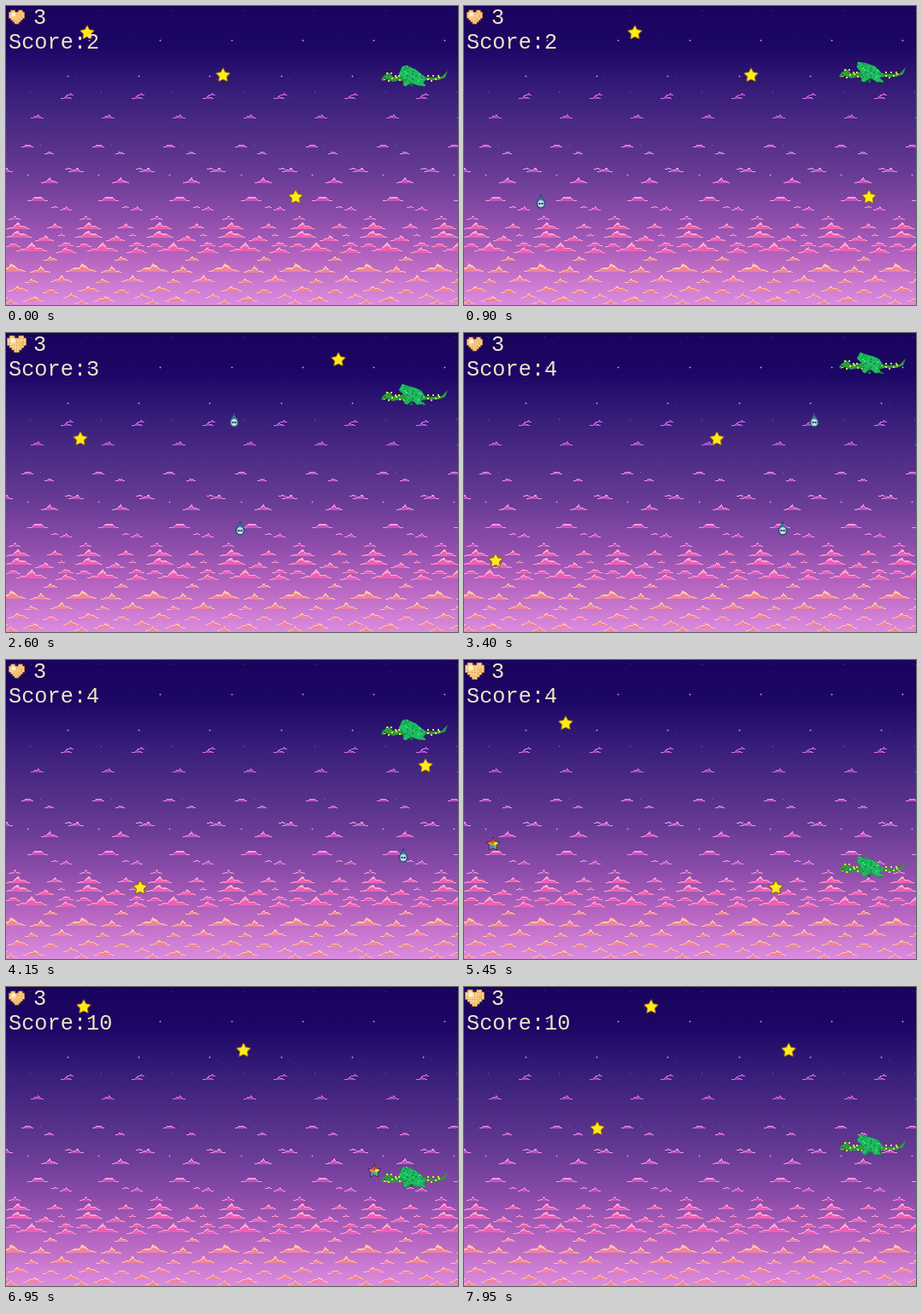
Write an HTML page with a canvas that moves like this. It is 529 by 351 pixels and loops after 8 s.

```html
<!DOCTYPE html>
<html lang="en">
<head>
<meta charset="utf-8">
<title>Dragon flight</title>
<style>
  html, body { margin: 0; width: 100%; height: 100%; overflow: hidden; background: #19035c; }
  canvas { display: block; width: 529px; height: 351px; }
</style>
</head>
<body>
<canvas id="stage" width="529" height="351"></canvas>
<script>
const W = 529, H = 351, LOOP = 8000, STEP = 50, TILE = 83.2;
const ctx = document.getElementById('stage').getContext('2d');

// Linear interpolation through [time, value] pairs; the outer segments extend when asked.
function track(keys, t, extend) {
  let i = 0;
  while (i < keys.length - 2 && t > keys[i + 1][0]) i++;
  const [t0, v0] = keys[i], [t1, v1] = keys[i + 1];
  let k = (t - t0) / (t1 - t0);
  if (!extend) k = Math.max(0, Math.min(1, k));
  return v0 + (v1 - v0) * k;
}

function polygon(g, points, fill, stroke) {
  g.beginPath();
  for (let i = 0; i < points.length; i += 2) g.lineTo(points[i], points[i + 1]);
  g.closePath();
  if (stroke) { g.strokeStyle = stroke; g.stroke(); }
  if (fill) { g.fillStyle = fill; g.fill(); }
}

function random(seed) {
  return () => (seed = (seed * 16807) % 2147483647) / 2147483647;
}

// ---------- Sky ----------
// Cloud rows inside one tile: centre x, base y, width.
const clouds = [
  [70, 109, 13], [75, 105, 8], [36, 132, 15], [25, 166, 14], [50, 174, 11],
  [73, 192, 8], [82, 195, 18], [51, 208, 20], [37, 229, 24], [57, 237, 8],
  [70, 240, 14], [10, 251, 14], [57, 261, 18], [14, 262, 28], [65, 270, 8],
  [14, 272, 32], [45, 276, 22], [70, 282, 18], [8, 283, 18], [30, 288, 36],
  [70, 290, 24], [52, 299, 16], [5, 312, 36], [40, 313, 24], [65, 324, 26],
  [30, 325, 16], [14, 335, 24], [52, 337, 18], [76, 343, 18], [32, 347, 24], [5, 350, 16]
];

function cloudColours(y) {
  if (y < 140) return ['#a13fc4', '#d274e4'];
  if (y < 200) return ['#b950c0', '#ec9ade'];
  if (y < 255) return ['#c94fc0', '#f59cda'];
  if (y < 295) return ['#ee5fb6', '#ffa8c9'];
  return ['#f0839f', '#ffc5a5'];
}

function drawCloud(g, cx, base, width) {
  const [body, light] = cloudColours(base), half = width / 2;
  for (let dx = -half; dx < half; dx++) {
    const u = dx / half;
    const bump = 0.55 + 0.45 * Math.abs(Math.cos(u * 4.5 + base * 0.35));
    const h = Math.max(1, Math.round(width ** 0.78 * 0.68 * (1 - Math.abs(u) ** 0.8) * bump));
    const x = Math.round(cx + dx), top = base - h;
    g.fillStyle = body;
    g.fillRect(x, top, 1, h);
    g.fillStyle = light;
    g.fillRect(x, top, 1, Math.max(1, h * 0.4 | 0));
  }
}

function makeSky() {
  const sky = document.createElement('canvas');
  sky.width = W; sky.height = H;
  const g = sky.getContext('2d');
  const shade = g.createLinearGradient(0, 0, 0, H);
  [[0, '#19035c'], [50, '#1d0766'], [100, '#371d79'], [150, '#4f2d87'], [200, '#693c96'],
   [250, '#8e4dab'], [300, '#b867c2'], [351, '#dc8cde']]
    .forEach(([y, colour]) => shade.addColorStop(y / H, colour));
  g.fillStyle = shade;
  g.fillRect(0, 0, W, H);

  const rnd = random(77);
  const specks = Array.from({ length: 14 }, () => [rnd() * TILE, rnd() * 160, 0.1 + rnd() * 0.2]);
  specks.push([28, 101, 0.6], [40, 163, 0.5]);
  const sparkles = [[14, 40], [72, 82], [25, 198]];
  for (let x0 = -TILE; x0 < W + TILE; x0 += TILE) {
    g.fillStyle = '#d296ff';
    for (const [x, y, alpha] of specks) {
      g.globalAlpha = alpha;
      g.fillRect(Math.round(x0 + x), Math.round(y), 1, 1);
    }
    for (const [x, y] of sparkles) {
      const px = Math.round(x0 + x);
      g.globalAlpha = 0.4;
      g.fillRect(px - 1, y, 3, 1);
      g.fillRect(px, y - 1, 1, 3);
      g.globalAlpha = 0.9;
      g.fillRect(px, y, 1, 1);
    }
    g.globalAlpha = 1;
    for (const [x, y, w] of clouds) drawCloud(g, x0 + x, y, w);
  }
  return sky;
}
const sky = makeSky();

// ---------- Flying things ----------
const starPoints = Array.from({ length: 10 }, (_, i) => {
  const r = i % 2 ? 4.2 : 8, a = i * Math.PI / 5 - Math.PI / 2;
  return [r * Math.cos(a), r * Math.sin(a) + 0.5];
}).flat();

const sprites = {
  star() {
    ctx.lineWidth = 2;
    ctx.lineJoin = 'round';
    polygon(ctx, starPoints, '#ffe91c', '#8a5a10');
  },
  rainbow() {
    ctx.scale(0.85, 0.85);
    ctx.lineWidth = 2;
    polygon(ctx, starPoints, '#f4d52c', '#30203c');
    ctx.clip();
    ['#f03a40', '#f4e030', '#38c850', '#3a90e8', '#f08028'].forEach((colour, i) => {
      const a = i * Math.PI * 0.4 - Math.PI * 0.7;
      ctx.beginPath();
      ctx.moveTo(0, 0.5);
      ctx.arc(0, 0.5, 10, a, a + Math.PI * 0.4);
      ctx.fillStyle = colour;
      ctx.fill();
    });
  },
  ghost() {
    ctx.beginPath();
    ctx.moveTo(0, -9);
    ctx.bezierCurveTo(0, -4, 5, -3, 5, 2);
    ctx.bezierCurveTo(5, 9, -5, 9, -5, 2);
    ctx.bezierCurveTo(-5, -2, -1, -4, 0, -9);
    ctx.fillStyle = '#3d7b9a';
    ctx.fill();
    ctx.lineWidth = 1;
    ctx.strokeStyle = '#23466f';
    ctx.stroke();
    ctx.fillStyle = '#c3dce8';
    ctx.beginPath();
    ctx.ellipse(0, 2, 3.5, 4, 0, 0, 7);
    ctx.fill();
    ctx.fillStyle = '#263650';
    ctx.fillRect(-2.5, 1, 2, 2);
    ctx.fillRect(0.5, 1, 2, 2);
  }
};

// x follows the [time, x] keys; a thing vanishes at its end time when caught.
const things = [
  { kind: 'star', y: 81, keys: [[0, 254], [1750, 413]], end: 1950 },
  { kind: 'star', y: 31, keys: [[0, 95], [1750, 299], [2600, 389]], end: 3000 },
  { kind: 'star', y: 224, keys: [[0, 339], [1000, 489]] },
  { kind: 'ghost', y: 230, keys: [[0, -10], [1750, 185], [2600, 274], [4150, 465]] },
  { kind: 'ghost', y: 103, keys: [[1750, 115], [2600, 267]] },
  { kind: 'star', y: 124, keys: [[2600, 87], [4150, 491]] },
  { kind: 'star', y: 267, keys: [[4150, 157], [5450, 365]], end: 5850 },
  { kind: 'star', y: 74, keys: [[5450, 119], [6950, 278], [7950, 380]] },
  { kind: 'rainbow', y: 216, keys: [[5450, 34], [6950, 431]], end: 7000 },
  { kind: 'star', y: 23, keys: [[6950, 91], [7950, 219]] },
  { kind: 'star', y: 166, keys: [[7050, -8], [7950, 156]] }
];

function drawThing({ kind, y, keys, end = LOOP }, t) {
  const x = track(keys, t, true);
  if (t >= end || x < -10 || x > W + 10) return;
  ctx.save();
  ctx.translate(Math.round(x), y);
  sprites[kind]();
  ctx.restore();
}

// ---------- Dragon ----------
const flight = [[0, 82], [2600, 82], [2950, 45], [3700, 45], [4100, 82], [4650, 82],
                [5450, 247], [5600, 262], [5900, 262], [6250, 223], [7600, 223], [7950, 195]];
const FLAP = 460;
const down = { bob: 0, wing: [-14, -11, -9, -12, 2, -7, 9, -1, 13, 4, 10, 8, 13, 12, 4, 11, -4, 8, -10, 12, -13, 11, -12, 4, -18, -2] };
const level = { bob: -4, wing: [-17, -12, -9, -11, 3, -7, 10, 0, 12, 4, 8, 6, 13, 11, 5, 11, -2, 6, -9, 11, -13, 10, -11, 2, -18, -6] };
const up = { bob: -9, wing: [-14, -13, -9, -11, 2, -8, 8, -5, 12, 1, 6, 4, 10, 10, 3, 11, -3, 5, -8, 11, -12, 9, -10, 1, -18, -6] };
const poses = [down, up, up, level];
const body = [-39, 4, -36, 0, -30, -4, -25, 1, -17, 0, -8, -2, 8, 1, 22, 2, 32, 1, 39, -6,
              36, 2, 28, 5, 15, 5, 4, 7, -8, 8, -17, 5, -25, 7, -32, 4, -37, 6];

function drawDragon(t) {
  const pose = poses[Math.floor(t / FLAP * 4) % 4];
  ctx.save();
  ctx.translate(478, Math.round(track(flight, t)) + pose.bob);
  polygon(ctx, body, '#2f9a3c');
  ctx.fillStyle = '#e4e83c';
  for (let i = 0; i < 15; i++) {
    const x = -36 + i * 4.6;
    ctx.fillRect(Math.round(x), Math.round(3 + 2 * Math.sin(i * 1.7)), 2, 2);
  }
  for (const x of [-33, -28, -23, -19, 15, 21, 27]) ctx.fillRect(x, x < -25 ? -4 : -1, 2, 2);
  ctx.fillStyle = '#18703a';
  ctx.fillRect(-36, 2, 2, 2);
  ctx.fillRect(-5, 9, 3, 3);
  ctx.fillRect(9, 10, 4, 2);

  ctx.lineWidth = 1;
  polygon(ctx, pose.wing, '#1fb860', '#137c45');
  ctx.clip();
  const rnd = random(19);
  const greens = ['#35e070', '#18a450', '#26cc66', '#108a48'];
  for (let i = 0; i < 65; i++) {
    ctx.fillStyle = greens[i % 4];
    ctx.fillRect(Math.round(-18 + rnd() * 32), Math.round(-13 + rnd() * 25), 2, 2);
  }
  ctx.restore();
}

// ---------- Display ----------
const heartRows = ['.##..##.', '########', '########', '########', '.######.', '..####..', '...##...'];

function drawHeart(size) {
  const cell = size / 8;
  const paint = (colour, grow, dx, dy) => {
    ctx.fillStyle = colour;
    heartRows.forEach((row, j) => [...row].forEach((c, i) => {
      if (c === '#') ctx.fillRect(12.5 + (i - 4) * cell + dx - grow, 13 + (j - 3.5) * cell + dy - grow,
                                  cell + 2 * grow, cell + 2 * grow);
    }));
  };
  paint('#a8672f', 0.7, 0, 0);
  paint('#ffd58c', 0, 0, 0);
  ctx.fillStyle = '#fff1d2';
  ctx.fillRect(12.5 - 2.7 * cell, 13 - 2.5 * cell, 2 * cell, 2 * cell);
  ctx.fillStyle = '#f3b766';
  ctx.fillRect(12.5 + 2 * cell, 13 - 1.5 * cell, cell, 2 * cell);
  ctx.fillRect(12.5 + cell, 13 + 0.5 * cell, cell, cell);
}

const scores = [[0, 2], [1950, 3], [3000, 4], [5850, 5], [6950, 10]];

function drawDisplay(t) {
  const beat = t % 600;
  drawHeart(beat >= 40 && beat < 300 ? 21.5 : 17.5);
  ctx.font = '25.3px "Liberation Mono", monospace';
  ctx.fillStyle = '#f2e3c2';
  ctx.fillText('3', 32, 21);
  const score = scores.filter(([start]) => t >= start).pop()[1];
  ctx.fillText('Score:' + score, 3, 50);
}

function render(now) {
  const t = Math.floor((now % LOOP) / STEP) * STEP;
  ctx.drawImage(sky, 0, 0);
  drawDragon(t);
  things.forEach(thing => drawThing(thing, t));
  drawDisplay(t);
}

let start;
function frame(now) {
  start ??= now;
  render(Math.max(0, now - start));
  requestAnimationFrame(frame);
}
render(0);
requestAnimationFrame(frame);
</script>
</body>
</html>
```
